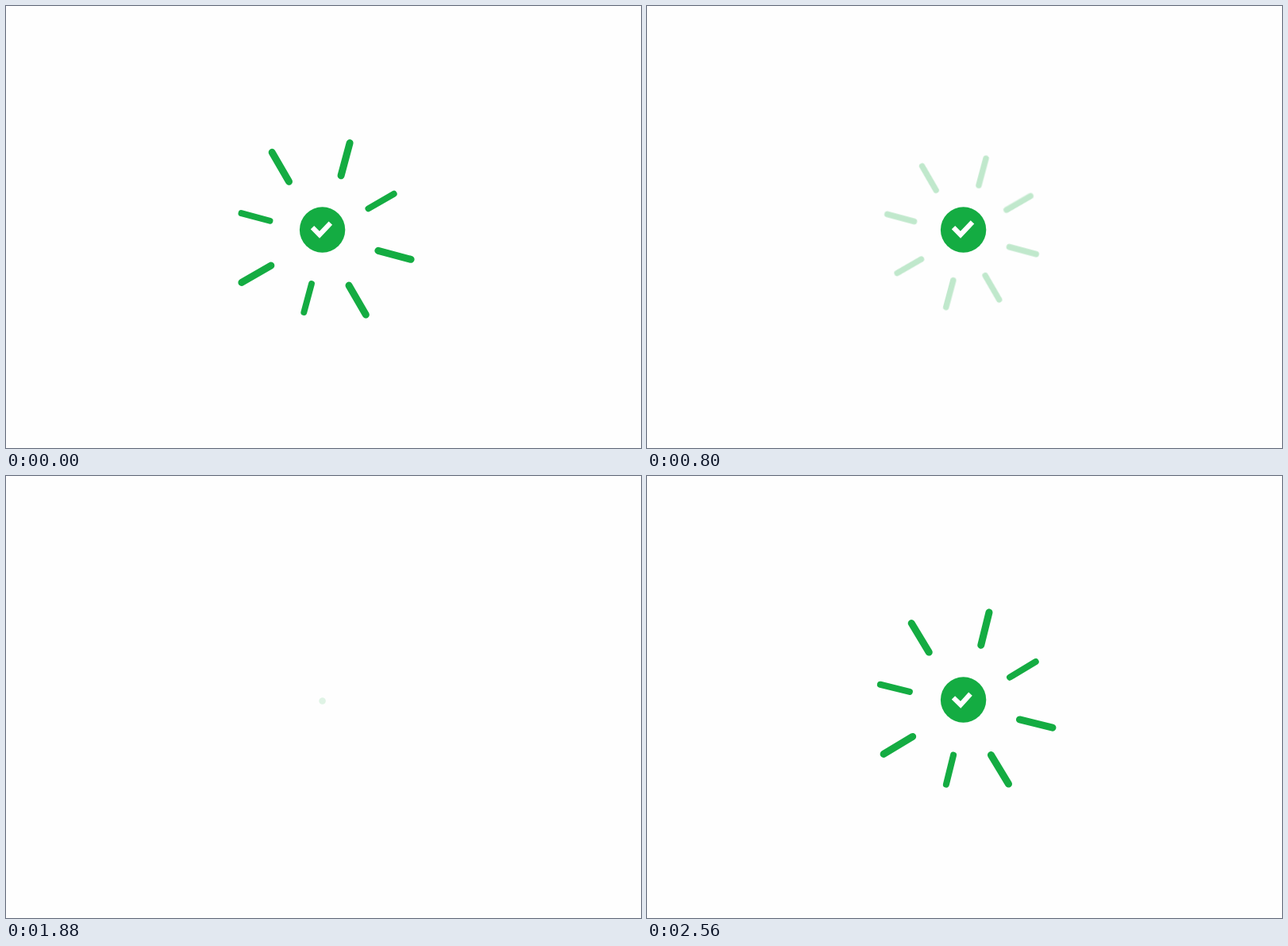
Animation of 800x557 px, one loop 2600 ms. Source, as an HTML page:

```html
<!DOCTYPE html>
<html lang="en">
<head>
<meta charset="utf-8">
<title>Success check</title>
<style>
  html, body { margin: 0; width: 100%; height: 100%; overflow: hidden; background: #fefefe; }
  svg { display: block; width: 100%; height: 100%; }
</style>
</head>
<body>
<svg viewBox="0 0 800 557">
  <g id="late" stroke="#14ac42" stroke-width="7.4" stroke-linecap="round"></g>
  <g id="early" stroke="#14ac42" stroke-width="7.4" stroke-linecap="round"></g>
  <g id="badge">
    <circle cx="398.6" cy="282" r="28.7" fill="#14ac42"/>
    <path id="tick" d="M386 279.1L395 288.2L410 272.3" fill="none" stroke="#fff" stroke-width="6.2"/>
  </g>
</svg>
<script>
const LOOP = 2600, REBIRTH = 1880;
const TILT = 15, RADIUS = 62, RAY = 35;
const $ = id => document.getElementById(id);
const late = $('late'), early = $('early'), badge = $('badge'), tick = $('tick');

const ramp = (t, from, to) => Math.min(1, Math.max(0, (t - from) / (to - from)));
const easeOut = u => 1 - (1 - u) ** 2;

// Eight rays on a ring set slightly off the centre of rotation;
// straight and diagonal ones cross at points of their own.
const ring = [-1, 3], crossings = [[3.8, 6], [0, 7.5]];

function addRay(k) {
  const angle = k * Math.PI / 4, c = Math.cos(angle), s = Math.sin(angle);
  const [x, y] = crossings[k % 2];
  const side = y * c - x * s;
  const near = RADIUS + ring[0] * c + ring[1] * s;
  const path = document.createElementNS('http://www.w3.org/2000/svg', 'path');
  path.setAttribute('d', `M${near} ${side}h${RAY}`);
  path.setAttribute('transform', `rotate(${k * 45})`);
  const isEarly = [2, 4, 7].includes(k);
  (isEarly ? early : late).append(path);
}
for (let k = 0; k < 8; k++) addRay(k);

// Rays shoot out past their resting size, then settle back.
function drawRays(group, t, peak, excess, angle) {
  const x = t - peak;
  const scale = x < 0 ? 1 + excess - 1.7e-5 * x * x : 1 + excess * Math.exp(-x / 135);
  const alpha = ramp(t, peak - 230, peak - 40) * (1 - ramp(t, 3020, 3540));
  group.setAttribute('opacity', alpha);
  group.setAttribute('transform',
    `translate(399 282) rotate(${angle + TILT}) scale(${alpha > 0 ? scale : 0})`);
}

function draw(time) {
  // One life runs from the dot's appearance, across the loop's end, to the fade.
  const phase = time % LOOP;
  const t = phase < REBIRTH ? phase + LOOP : phase;
  const angle = -15 * (1 - ramp(t, 2190, 2590));

  drawRays(early, t, 2460, 0.185, angle);
  drawRays(late, t, 2590, 0.235, angle);

  const size = easeOut(ramp(t, 1830, 2480));
  const fade = Math.max(0.028, 1 - ramp(t, 3585, 3847));
  badge.setAttribute('opacity', ramp(t, 1845, 2110) * fade);
  badge.setAttribute('transform',
    `translate(398.6 283.8) scale(${size}) translate(-398.6 -283.8)`);

  const length = 34.8 * easeOut(ramp(t, 2264, 2700));
  tick.setAttribute('stroke-dasharray', `${length} 60`);
  tick.setAttribute('visibility', length > 0 ? 'visible' : 'hidden');
  tick.setAttribute('transform', `rotate(${angle} 399 282)`);
}

let start;
function frame(now) {
  if (start === undefined) start = now;
  draw(now - start);
  requestAnimationFrame(frame);
}
draw(0);
requestAnimationFrame(frame);
</script>
</body>
</html>
```
